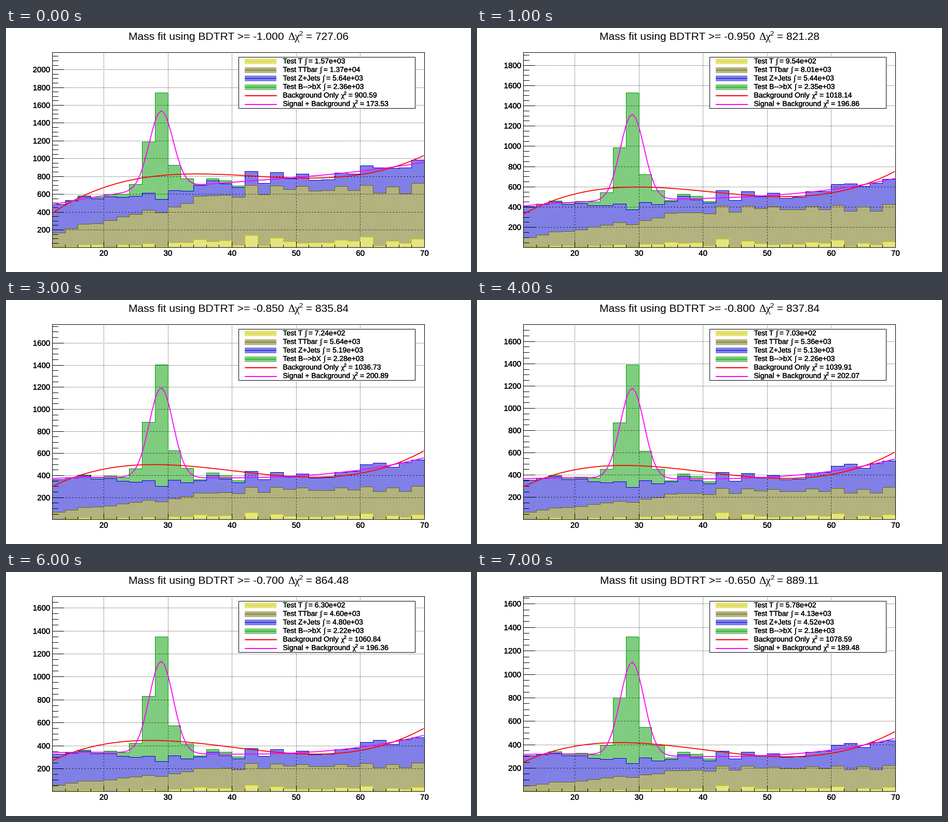
These frames come from a looping animation (896x472 px, 8000 ms). A matplotlib script:

```python
from itertools import groupby

import matplotlib.pyplot as plt
import numpy as np
from matplotlib import patheffects
from matplotlib.animation import FuncAnimation
from matplotlib.textpath import TextPath

W, H, DPI = 896, 472, 64
PX = 72 / DPI                                  # one pixel in points
LEFT, RIGHT, TOP, BASE = 89, 806, 47, 424
SANS, SERIF = "Liberation Sans", "Liberation Serif"

BLACK, WHITE = (0, 0, 0), (255, 255, 255)
GREEN, BLUE, OLIVE, YELLOW = (0, 153, 0), (0, 0, 204), (102, 102, 0), (204, 204, 0)
LAYERS = (GREEN, BLUE, OLIVE, YELLOW)          # from the top of the stack down

# Key results of the scan; steps between them are interpolated
KEY_STEPS = [0, 1, 2, 3, 5, 7]
KEYS = dict(
    y_max=[2190, 1923, 1821, 1766, 1734, 1662],
    t=[1570, 954, 800, 724, 682, 578],
    tt=[13700, 8010, 6490, 5640, 5080, 4130],
    z=[5640, 5440, 5310, 5190, 5070, 4520],
    b=[2360, 2350, 2330, 2280, 2250, 2180],
    chi_bkg=[900.59, 1018.14, 1011.244, 1036.73, 1043.094, 1078.59],
    chi_sig=[173.53, 196.86, 185.506, 200.89, 203.246, 189.48])

MASS = np.arange(13, 70, 2)                    # bin centres
FINE = np.linspace(12, 69.8, 120)
PEAK, SIGMA = 28.95, 1.85

row, col = np.mgrid[:H, :W]
CHECKER = ((row + col) % 2 == 1)[..., None]


def shape(curve, noise, rng):
    """Normalised spectrum with fixed bin-to-bin scatter."""
    s = curve * np.maximum(1 + noise * rng.standard_normal(MASS.size), .1)
    return s / s.sum()


rng = np.random.default_rng(4)
RAMP = np.minimum(MASS, 44)
T_SHAPE = shape(RAMP - 8, .4, rng)
TT_SHAPE = shape(RAMP, .04, rng)
Z_SHAPE = shape(20 + .035 * (MASS - 43) ** 2, .12, rng)
B_SHAPE = np.interp(MASS, [13, 21, 23, 25, 27, 29, 31, 33, 35, 39, 43],
                    [0, .02, .03, .11, .48, 1, .24, .12, .01, .03, 0])


def results(i):
    return {name: np.interp(i, KEY_STEPS, v) for name, v in KEYS.items()}


def stack(r):
    """Cumulative bin contents, from the highest layer down."""
    single = r["t"] * T_SHAPE
    ttbar = single + r["tt"] * TT_SHAPE
    zjets = ttbar + r["z"] * Z_SHAPE
    k = B_SHAPE.argmax()
    total = zjets + B_SHAPE * (r["y_max"] / 1.26 - zjets[k])
    return total, zjets, ttbar, single


def basis(m, with_peak):
    b = np.vander((m - 41) / 29, 4)
    if with_peak:
        b = np.column_stack([b, np.exp(-.5 * ((m - PEAK) / SIGMA) ** 2)])
    return b


def fit(counts, with_peak):
    """Least chi2 fit of a cubic, optionally with a Gaussian on top."""
    err = np.sqrt(counts)
    a = basis(MASS, with_peak) / err[:, None]
    coef = np.linalg.lstsq(a, counts / err, rcond=None)[0]
    return basis(FINE, with_peak) @ coef


def to_x(mass):
    return LEFT + (mass - 12) * (RIGHT - LEFT) / 58


def to_y(value, y_max):
    return BASE + .4 - value * (BASE - TOP) / y_max


EDGES = np.rint(to_x(np.arange(12, 71, 2))).astype(int)


def stipple(img, x0, x1, y0, y1, color):
    img[y0:y1, x0:x1] = np.where(CHECKER[y0:y1, x0:x1], color, WHITE)


def outline(img, tops, color):
    prev = BASE
    for x0, x1, y in zip(EDGES, EDGES[1:], tops):
        img[y, x0:x1 + 1] = color
        img[min(prev, y):max(prev, y) + 1, x0] = color
        prev = y


def frame_box(img, x0, x1, y0, y1):
    img[[y0, y1], x0:x1 + 1] = BLACK
    img[y0:y1 + 1, [x0, x1]] = BLACK


def y_ticks(y_max):
    for n in range(1, int(y_max // 50) + 1):
        yield n, round(to_y(50 * n, y_max))


def raster(layers, y_max):
    img = np.full((H, W, 3), 255, np.uint8)
    tops = [np.rint(to_y(v, y_max)).astype(int) for v in layers]
    for layer, color in zip(tops, LAYERS):
        for x0, x1, y in zip(EDGES, EDGES[1:], layer):
            stipple(img, x0, x1, y, BASE, color)

    for mass in range(20, 70, 10):
        img[TOP:BASE:3, round(to_x(mass))] = BLACK
    for n, y in y_ticks(y_max):
        if n % 4 == 0:
            img[y, LEFT:RIGHT:3] = BLACK

    for layer, color in zip(tops, LAYERS):
        outline(img, layer, color)

    for n, y in y_ticks(y_max):
        img[y, LEFT:LEFT + (23 if n % 4 == 0 else 12)] = BLACK
    for k, x in enumerate(EDGES):
        img[BASE - (11 if k % 5 == 4 else 5):BASE, x] = BLACK
    frame_box(img, LEFT, RIGHT, TOP, BASE)

    img[56:156, 448:789] = WHITE
    frame_box(img, 448, 788, 56, 155)
    for k, color in enumerate(reversed(LAYERS)):
        y = round(64.25 + 16.5 * k)
        stipple(img, 460, 521, y - 5, y + 6, color)
        img[y, 460:521] = color
    return img


def advance(s, font, px):
    def end(t):
        return TextPath((0, 0), t, size=px, prop={"family": font}).get_extents().x1
    return end(s + "|") - end("|")


def kind(c):
    return "symbol" if c in "Δχ∫" else "super" if c == "²" else "plain"


# Slightly heavier strokes for the small text
HEAVY = [patheffects.Stroke(linewidth=.35 * PX, foreground="black"), patheffects.Normal()]


def rich_text(x, y, s, px, centred=False, effects=None):
    """Text with Greek symbols and raised digits, set on a baseline."""
    runs = []
    for style, chars in groupby(s, kind):
        run = "".join(chars)
        font = SERIF if style == "symbol" else SANS
        size, lift, shift = px, 0, 0
        if style == "super":
            run, size, lift = "2", px * .64, px * .38
        elif style == "symbol":
            shift = px * .07
        runs.append((run, font, size, lift, shift, advance(run, font, size)))
    if centred:
        x -= sum(r[-1] for r in runs) / 2
    for run, font, size, lift, shift, step in runs:
        ax.text(x + shift, y - lift, run, family=font, size=size * PX,
                va="baseline", path_effects=effects)
        x += step


fig = plt.figure(figsize=(W / DPI, H / DPI), dpi=DPI, facecolor="white")
ax = fig.add_axes([0, 0, 1, 1])
picture = ax.imshow(np.full((H, W, 3), 255, np.uint8), interpolation="nearest", aspect="auto")
ax.set(xlim=(-.5, W - .5), ylim=(H - .5, -.5))
ax.axis("off")

curves = []
for color, y in (("#ff0000", 130), ("#ff00ff", 147)):
    ax.plot([460, 520], [y, y], color=color, lw=2 * PX)
    curves += ax.plot([], [], color=color, lw=1.8 * PX)


def draw(i):
    r = results(i)
    y_max = r["y_max"]
    layers = stack(r)
    picture.set_data(raster(layers, y_max))
    for curve, with_peak in zip(curves, (False, True)):
        curve.set_data(to_x(FINE), to_y(fit(layers[0], with_peak), y_max))

    for t in list(ax.texts):
        t.remove()
    gain = r["chi_bkg"] - r["chi_sig"]
    title = f"Mass fit using BDTRT >= {-1 + .05 * i:.3f} Δχ² = {gain:.2f}"
    rich_text(447.5, 22.5, title, 21, centred=True)
    legend = (f"Test T ∫ = {r['t']:.2e}",
              f"Test TTbar ∫ = {r['tt']:.2e}",
              f"Test Z+Jets ∫ = {r['z']:.2e}",
              f"Test B-->bX ∫ = {r['b']:.2e}",
              f"Background Only χ² = {r['chi_bkg']:.2f}",
              f"Signal + Background χ² = {r['chi_sig']:.2f}")
    for k, s in enumerate(legend):
        rich_text(533, 68 + 16.5 * k, s, 14, effects=HEAVY)

    label = dict(family=SANS, size=15 * PX, va="baseline", path_effects=HEAVY)
    for mass in range(20, 71, 10):
        ax.text(to_x(mass), 440, str(mass), ha="center", **label)
    for n, y in y_ticks(y_max):
        if n % 4 == 0:
            ax.text(85, y + 5, str(50 * n), ha="right", **label)
    return []


anim = FuncAnimation(fig, draw, frames=8, interval=1000, repeat=True, repeat_delay=0)
plt.show()
```
